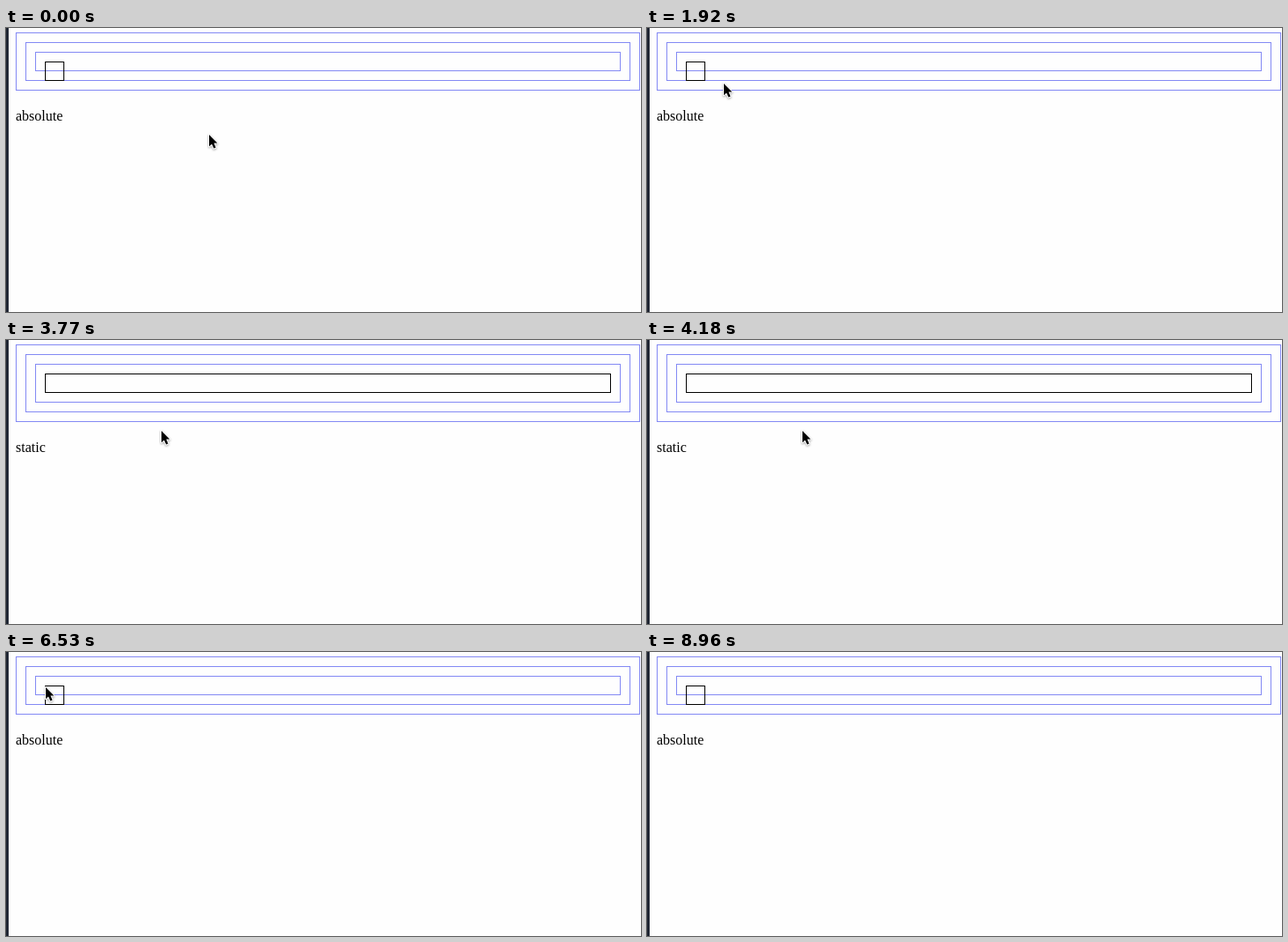
These frames come from a looping animation (719 by 322 pixels, 9.32 s). An HTML page:

```html
<!DOCTYPE html>
<html lang="en">
<head>
<meta charset="utf-8">
<title>Position toggle</title>
<style>
  html, body { margin: 0; width: 100%; height: 100%; overflow: hidden; background: #fefefe; }
  #stage { position: relative; width: 719px; height: 322px; overflow: hidden; }
  #stage > * { position: absolute; box-sizing: border-box; }
  #edge { left: 0; top: 0; width: 3px; height: 322px; background: #202734; }
  .frame { border: 1px solid #8389f4; }
  #box { left: 44px; top: 38px; width: 22px; height: 22px; border: 1px solid #000; }
  #label {
    left: 11px; height: 18px; white-space: nowrap; color: #000;
    font: 16px/18px "Liberation Serif", "Times New Roman", serif;
  }
  #label.selected { background: #b3d7fe; }
  #cursor {
    left: 0; top: 0; width: 16px; height: 22px; overflow: visible;
    filter: drop-shadow(0 1px 0.8px rgba(0, 0, 0, .35));
  }
  #cursor path { fill: #000; stroke: #fff; stroke-width: 2; stroke-linejoin: round; paint-order: stroke; }
</style>
</head>
<body>
<div id="stage">
  <div id="edge"></div>
  <div class="frame"></div>
  <div class="frame"></div>
  <div class="frame"></div>
  <div id="box"></div>
  <div id="label"></div>
  <svg id="cursor"><path d="M0 0V13.2L3 10.4L5.3 15.6L7.6 14.6L5.4 9.6H9.4Z"/></svg>
</div>
<script>
const LOOP = 9320;
const LEAVE = 8960;
const START = [230, 121];

// Clicks alternate between the two layouts, beginning with "absolute".
const toggles = [2390, 3470, 3650, 3940, 4180, 4290, 6060, 6530, 6770, 7130, 7540, 7960];
// A double click selects the label until the next toggle.
const selections = [[3830, 3940], [6290, 6530]];

const linear = u => u;
const easeOut = u => 1 - (1 - u) ** 2;
const easeIn = u => u ** 1.4;
const smooth = u => u * u * (3 - 2 * u);

// [first step, last step, step count, x, y, easing]
const moves = [
  [350, 690, 6, 190, 84, smooth],
  [750, 810, 2, 193, 89, linear],
  [990, 1100, 3, 99, 65, linear],
  [1160, 1390, 5, 57, 49, easeOut],
  [1810, 2100, 6, 173, 104, smooth],
  [2810, 2810, 1, 176, 103, linear],
  [4350, 4580, 5, 93, 60, linear],
  [4640, 4870, 5, 54, 43, easeOut],
  [5050, 5100, 2, 46, 42, linear],
  [5280, 5280, 1, 46, 41, linear],
  [5460, 5460, 1, 45, 40, linear],
  [8200, 8900, 12, 680, 310, easeIn]
];

const frames = document.querySelectorAll(".frame");
const [box, label, cursor] = ["box", "label", "cursor"].map(id => document.getElementById(id));

frames.forEach((el, i) => {
  el.style.left = 11 + 11 * i + "px";
  el.style.top = 5 + 11 * i + "px";
  el.style.width = 707 - 22 * i + "px";
});

function cursorAt(t) {
  let [x, y] = START;
  for (const [first, last, count, toX, toY, ease] of moves) {
    if (t < first) break;
    const gap = (last - first) / (count - 1) || 1;
    const step = Math.min(count, Math.floor((t - first) / gap + 1e-6) + 1);
    const u = ease(step / count);
    x += (toX - x) * u;
    y += (toY - y) * u;
  }
  return [Math.round(x), Math.round(y)];
}

function draw(t) {
  const isStatic = toggles.filter(at => at <= t).length % 2 === 1;
  const grow = isStatic ? 22 : 0;
  frames.forEach((el, i) => el.style.height = 66 - 22 * i + grow + "px");
  box.style.width = (isStatic ? 641 : 22) + "px";
  label.textContent = isStatic ? "static" : "absolute";
  label.style.top = 91 + grow + "px";
  label.classList.toggle("selected", selections.some(([from, to]) => t >= from && t < to));
  const [x, y] = cursorAt(t);
  cursor.style.transform = `translate(${x}px, ${y}px)`;
  cursor.style.visibility = t < LEAVE ? "visible" : "hidden";
}

function tick() {
  draw(performance.now() % LOOP);
  requestAnimationFrame(tick);
}
tick();
</script>
</body>
</html>
```
